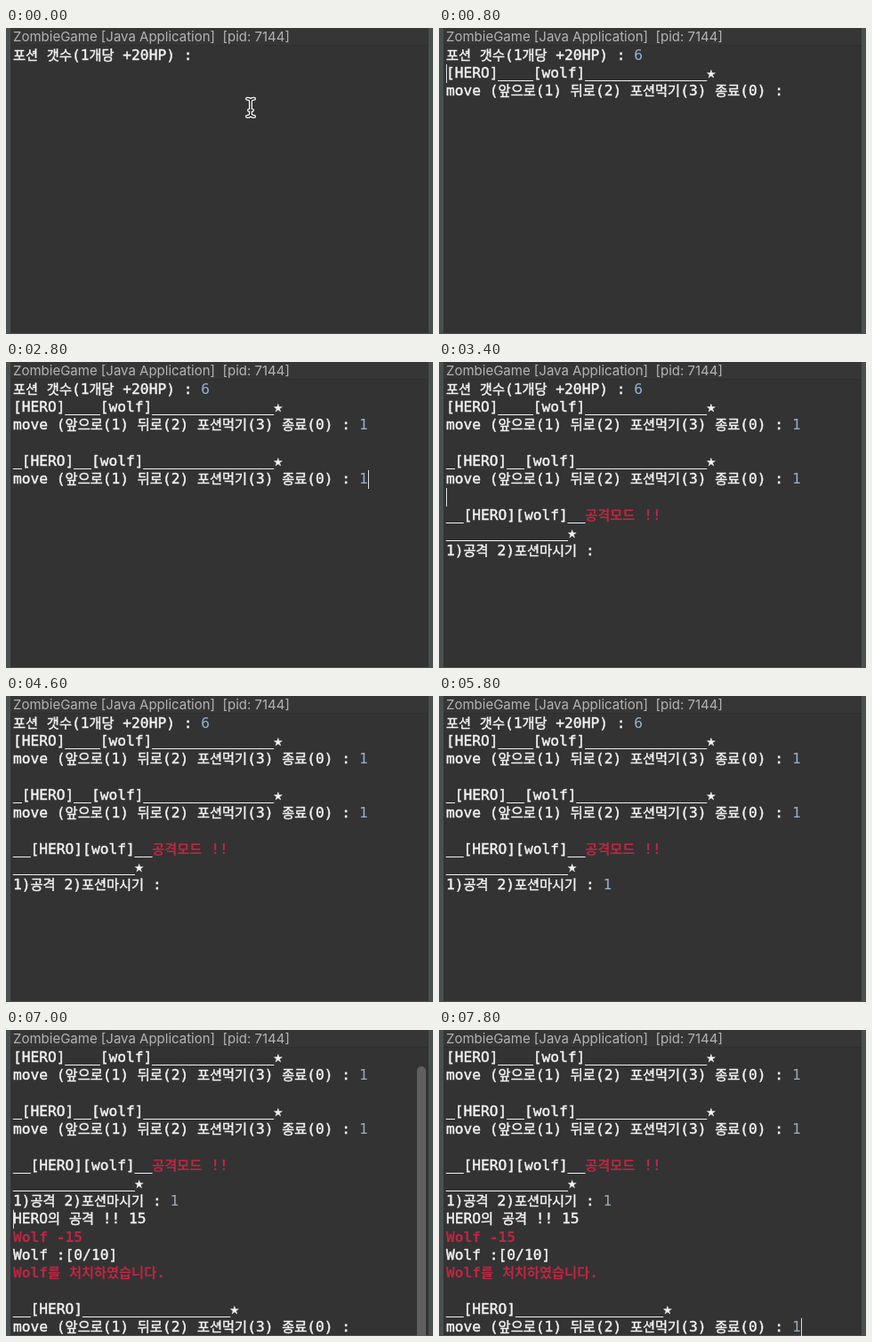
These frames come from a looping animation (480x345 px, 8 s). An HTML page:

```html
<!DOCTYPE html>
<html lang="ko">
<head>
<meta charset="utf-8">
<style>
html, body { margin: 0; width: 100%; height: 100%; overflow: hidden; background: #4a5050; }
#stage { position: relative; width: 480px; height: 345px; overflow: hidden; }
#stage div, #stage svg { position: absolute; }
#panel { left: 5px; top: 0; width: 470px; height: 344px; background: #333; }
#title { left: 5px; top: 0; width: 467px; height: 19px; padding-left: 3px; background: #363636; color: #b4b4b4;
  border-bottom: 1px solid #2e2e2e; font: 15px/19px Inter, Roboto, sans-serif; white-space: pre; }
#view { left: 0; top: 20px; width: 480px; height: 325px; overflow: hidden; }
#text { left: 0; top: .8px; }
.row { left: 8px; height: 20.27px; white-space: pre; color: #f2f2f2; -webkit-text-stroke: .45px;
  font: 16.23px/20.27px "DejaVu Sans Mono", monospace; }
.ko { font: 15.27px/0 "Noto Sans CJK KR", "Noto Sans CJK", sans-serif; font-weight: inherit; }
.red { color: #bd2642; font-weight: bold; -webkit-text-stroke: 0; }
.num { color: #93b3d3; -webkit-text-stroke: 0; }
.scrolled .num { color: #9caab8; }
#caret { width: 1px; height: 20.5px; background: #dde2e6; }
#bar { left: 462px; top: 41px; width: 10px; height: 320px; border-radius: 5px; background: #606060; }
#mouse { left: 0; top: 0; }
</style>
</head>
<body>
<div id="stage">
  <div id="panel"></div>
  <div id="view"><div id="text"><div id="caret"></div></div></div>
  <div id="title">ZombieGame [Java Application]  [pid: 7144]</div>
  <div id="bar"></div>
  <svg id="mouse" width="14" height="28" viewBox="-7 -14 14 28" fill="none" stroke-linecap="round">
    <path id="beam" d="M-4-10Q0-10 0-7Q0-10 4-10M0-7V7M-4 10Q0 10 0 7Q0 10 4 10M-2 3H2"/>
    <use href="#beam" stroke="#fff" stroke-width="4"/>
    <use href="#beam" stroke="#222" stroke-width="1.5"/>
  </svg>
</div>
<script>
const LOOP = 8000, PITCH = 20.27, LEFT = 8, BLINK = 500, SCROLL_AT = 6000;
const $ = id => document.getElementById(id);
const line = n => '_'.repeat(n);
const MOVE = 'move (앞으로(1) 뒤로(2) 포션먹기(3) 종료(0) : ';

// Each turn prints its lines, then a digit is typed after the last one; {} marks red.
const turns = [
  { at: 0, key: 6, typed: 600, lines: ['포션 갯수(1개당 +20HP) : '] },
  { at: 800, key: 1, typed: 1400, lines: [`[HERO]____[wolf]${line(14)}★`, MOVE] },
  { at: 2400, key: 1, typed: 2800, lines: ['', `_[HERO]__[wolf]${line(15)}★`, MOVE] },
  { at: 3100, key: 1, typed: 5200, lines: [
    '', '__[HERO][wolf]__{공격모드 !!}', `${line(14)}★`, '1)공격 2)포션마시기 : '] },
  { at: SCROLL_AT, key: 1, typed: 7600, lines: [
    'HERO의 공격 !! 15', '{Wolf -15}', 'Wolf :[0/10]', '{Wolf를 처치하였습니다.}',
    '', `__[HERO]${line(17)}★`, MOVE] }
];

const clamp = v => Math.max(0, Math.min(1, v));
const show = (el, on) => { el.style.visibility = on ? 'visible' : 'hidden'; };

const timed = [];   // [element, shown at]
const carets = [];  // { at, x, y }
let count = 0;

function addRow(text) {
  const el = document.createElement('div');
  el.className = 'row';
  el.style.top = count++ * PITCH + 'px';
  el.innerHTML = text
    .replace(/[가-힣]+/g, '<span class="ko">$&</span>')
    .replace('{', '<span class="red">').replace('}', '</span>');
  $('text').append(el);
  return el;
}

for (const { at, key, typed, lines } of turns) {
  if (at) carets.push({ at, x: LEFT, y: count * PITCH });
  const els = lines.map(addRow);
  const num = document.createElement('span');
  num.className = 'num';
  num.textContent = key;
  els.at(-1).append(num);
  timed.push(...els.map(el => [el, at]), [num, typed]);
  carets.push({ at: typed, x: LEFT + num.offsetLeft + num.offsetWidth, y: (count - 1) * PITCH });
}

function draw(t) {
  for (const [el, from] of timed) show(el, t >= from);
  const scrolled = t >= SCROLL_AT;
  $('text').className = scrolled ? 'scrolled' : '';
  $('text').style.transform = `translateY(${scrolled ? -PITCH : 0}px)`;

  // The blink restarts whenever the caret moves.
  const caret = carets.findLast(c => c.at <= t);
  show($('caret'), caret && (t - caret.at) % (2 * BLINK) < BLINK);
  if (caret) {
    $('caret').style.left = caret.x + 'px';
    $('caret').style.top = caret.y + 'px';
  }

  show($('mouse'), t < 500);
  $('mouse').style.transform = `translate(${268 + t * .03}px, ${76 - t * .16}px)`;

  const fadeIn = .5 + (t - SCROLL_AT) / 1200, fadeOut = (7600 - t) / 600;
  $('bar').style.opacity = scrolled ? clamp(Math.min(fadeIn, fadeOut)) : 0;
}

const start = performance.now();
(function tick() {
  draw((performance.now() - start) % LOOP);
  requestAnimationFrame(tick);
})();
</script>
</body>
</html>
```
